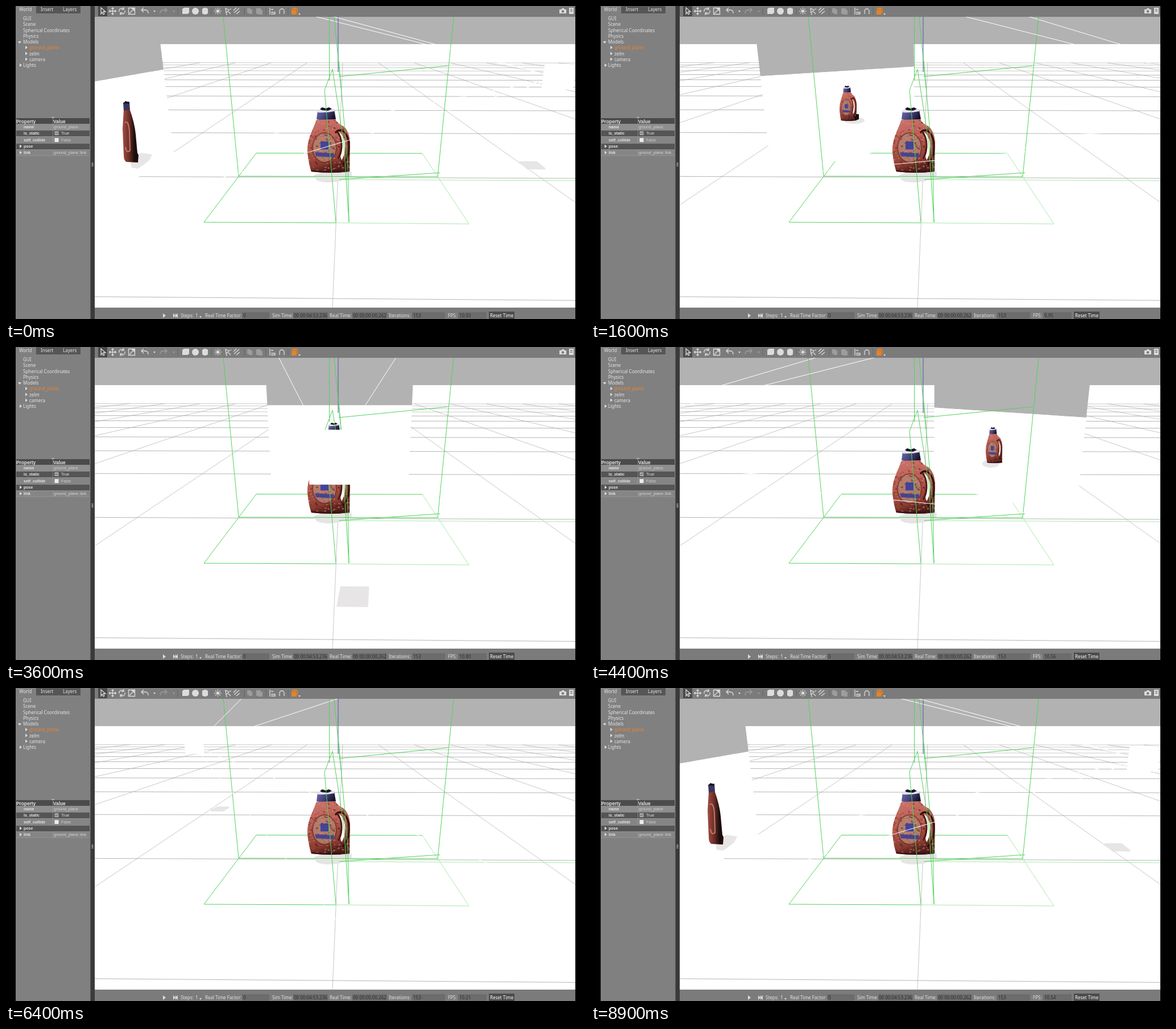
Write an HTML page that moves like this. It is 1018 px wide and 550 px high and loops after 9.1 s.

```html
<!DOCTYPE html>
<html lang="en">
<head>
<meta charset="utf-8">
<title>Camera around a bottle</title>
<style>
html, body { margin: 0; width: 100%; height: 100%; overflow: hidden; background: #000; }
svg { display: block; width: 1018px; height: 550px; }
text { font: 8px "Noto Sans", "Open Sans", sans-serif; fill: #e4e4e4; white-space: pre; }
.prop text { font: 7px "Liberation Sans", Arial, sans-serif; }
.prop .b { font-weight: bold; }
.grid line { stroke: #a2a2a2; stroke-width: .8; }
.green path { stroke: #4fd35a; stroke-width: 1; fill: none; }
.green .pale { stroke: #a9e8ae; }
.rays line { stroke: #fff; stroke-width: 1; }
.icon { fill: none; stroke: #dcdcdc; stroke-width: 1.3; }
.solid { fill: #dcdcdc; }
.dim { opacity: .35; }
</style>
</head>
<body>
<svg viewBox="0 0 1018 550" xmlns="http://www.w3.org/2000/svg">
<defs>
  <clipPath id="view"><rect x="156" y="19" width="845" height="511"/></clipPath>
  <clipPath id="skin"><path d="M546 200 L579 199 Q583 207 593 211 Q603 219 605 238 L604 291 Q570 295 537 291 Q533 282 530 257 Q529 240 537 222 Z"/></clipPath>
  <linearGradient id="red" x1="0" y1="0" x2=".25" y2="1">
    <stop offset="0" stop-color="#cf7972"/><stop offset=".5" stop-color="#b4594d"/>
    <stop offset=".85" stop-color="#8c3d32"/><stop offset="1" stop-color="#4c1c19"/>
  </linearGradient>
  <linearGradient id="cap" x1="0" y1="0" x2="1" y2=".4">
    <stop offset="0" stop-color="#6d6cab"/><stop offset=".55" stop-color="#45447d"/><stop offset="1" stop-color="#17152b"/>
  </linearGradient>
  <linearGradient id="shade">
    <stop offset="0" stop-color="#a24e42"/><stop offset=".4" stop-color="#6d2f28"/><stop offset=".75" stop-color="#1d0d0d"/>
  </linearGradient>
  <g id="bottle">
    <path d="M548 183 L577 182 L580 199 Q564 204 546 199 Z" fill="url(#cap)"/>
    <path d="M548 183 L577 181 L577 185 Q562 188 548 187 Z" fill="#e4e1ec"/>
    <path d="M552 181 L556 178 L562 180 L568 178 L573 181 L566 184 L555 183 Z" fill="#171520"/>
    <g clip-path="url(#skin)">
      <rect x="528" y="198" width="80" height="96" fill="url(#red)"/>
      <ellipse cx="560" cy="249" rx="20" ry="25" fill="#b28572" opacity=".8"/>
      <g id="spots"></g>
      <ellipse cx="560" cy="249" rx="21" ry="26" fill="none" stroke="#6d2c26" stroke-width="2" opacity=".6"/>
      <rect x="553" y="238" width="14" height="14" fill="#43439a"/>
      <path d="M543 257 L577 259 L576 266 L545 264 Z" fill="#46448f"/>
      <path d="M579 223 Q585 215 594 221 Q604 230 603 252 Q602 269 592 279" fill="none" stroke="#2a1010" stroke-width="3"/>
      <path d="M583 221 Q593 224 596 240 Q598 258 590 271 L588 264 Q594 248 589 234 Z" fill="#fff"/>
      <path d="M582 220 Q590 230 590 244 Q590 258 584 268" fill="none" stroke="#4b1d18" stroke-width="3"/>
      <path d="M532 288 Q570 292 606 286 V296 H530 Z" fill="#35110f" opacity=".8"/>
    </g>
  </g>
</defs>

<g clip-path="url(#view)">
  <rect x="156" y="19" width="845" height="511" fill="#b2b2b2"/>
  <rect x="156" y="67" width="845" height="463" fill="#fff"/>
  <g id="grid" class="grid"></g>
  <g class="green">
    <path d="M580 381 L348 380 L440 258.500 L732 259"/>
    <path class="pale" d="M732 259 L814 383 L580 381 M586 305 L1001 307"/>
  </g>
  <path id="screenSky" fill="#b2b2b2"/>
  <path id="screenGround" fill="#fff"/>
  <g id="mini"></g>
  <path id="camShadow" fill="#e7e5e5" stroke="#e7e5e5" stroke-width="3" stroke-linejoin="round"/>
  <path d="M541 298 Q550 291 575 292 L607 291 Q611 300 600 303 L586 308 Q560 313 546 306 Z" fill="#e6e4e4"/>
  <g id="backBody"></g>
  <g id="backRays" class="rays"></g>
  <use href="#bottle"/>
  <path d="M584 19 V116" stroke="#5353a8"/>
  <g class="green">
    <path d="M382 19 L409 299 L759 300 L787 19"/>
    <path d="M568.500 19 V131 M577 19 L589 145 M585 96 L601 278 L603 380 L594 242 L574 111 L560 148 L580 380"/>
    <path d="M585 124 L777 105 M586 305 L763 293"/>
  </g>
  <g id="frontRays" class="rays"></g>
  <g id="frontBody"></g>
</g>

<rect x="156" width="845" height="19" fill="#7b7b7b"/>
<rect x="156" y="530" width="845" height="20" fill="#7b7b7b"/>
<rect x="17" width="133" height="550" fill="#808080"/>
<rect x="53" width="78" height="13" fill="#565656"/>
<rect x="149" width="7" height="550" fill="#3a3a3a"/>
<rect x="148" width="1" height="550" fill="#5a5a5a"/>
<path d="M150.500 276h3M150.500 278.500h3M150.500 281h3M80 196h5" stroke="#ddd"/>
<g id="tree"></g>
<g id="props" class="prop"></g>
<g id="tools"></g>
<g id="status"></g>
</svg>

<script>
const LOOP = 9100;
const RADIUS = 0.99, REACH = 1.98, HALF = 0.49, EYE = 0.49;
const CENTRE_Y = -0.05, VIEWER_Y = -1.953;
const $ = id => document.getElementById(id);

// start time, camera corner on a square path, frame rate readout
const POSES = [
  [0, 1, 0, "10.93"], [1400, 1, -1, "9.95"], [2700, 0, -1, "10.80"],
  [3800, -1, -1, "10.56"], [4700, -1, 0, "10.03"], [5900, -1, 1, "10.21"],
  [6900, 0, 1, "10.53"], [7800, 1, 1, "10.47"], [8400, 1, 0, "10.54"]
];

// ground coordinates in metres (x right, y away, z up) to the stage
function project([x, y, z]) {
  const drop = 0.66 - z;
  const depth = y - VIEWER_Y + 0.298 * drop - 0.013 * x;
  return [593.8 + (764 * x - 22) / depth, 56.5 + 797 * drop / depth];
}
const flat = points => "M" + points.map(p => project(p).map(v => v.toFixed(1)).join(" ")).join("L") + "Z";
function segment(a, b, extra = "") {
  const [x1, y1] = project(a), [x2, y2] = project(b);
  return `<line x1="${x1}" y1="${y1}" x2="${x2}" y2="${y2}" ${extra}/>`;
}

function buildGrid() {
  let out = "";
  for (let n = -1; n <= 10; n++) {
    out += segment([-10, n, 0], [10, n, 0], n > 6 ? 'opacity=".7"' : "");
    out += segment([n, -1.2, 0], [n, 10, 0], 'opacity=".75"');
    if (n > 1) out += segment([-n, -1.2, 0], [-n, 10, 0], 'opacity=".75"');
  }
  $("grid").innerHTML = out;
}

function buildSpots() {
  let seed = 7, out = "";
  const rand = () => (seed = seed * 16807 % 2147483647) / 2147483647;
  const tones = ["#e59b8d", "#5a2019", "#8f3c33", "#d3806f", "#45150f"];
  for (let i = 0; i < 340; i++) {
    const x = 529 + rand() * 77, y = 200 + rand() * 92;
    out += `<ellipse cx="${x.toFixed(1)}" cy="${y.toFixed(1)}" rx="${(0.6 + rand() * 1.6).toFixed(1)}" ry="${(0.5 + rand()).toFixed(1)}" fill="${tones[i % 5]}" opacity=".5"/>`;
  }
  $("spots").innerHTML = out;
}

const label = (x, y, s, extra = "") => `<text x="${x}" y="${y}" ${extra}>${s}</text>`;
const arrow = (x, y, open) => `<path class="solid" d="M${x} ${y}${open ? "h6l-3 4z" : "v6l4 -3z"}"/>`;
const smallArrow = (x, y) => `<path class="solid" d="M${x} ${y}h4l-2 3z"/>`;
const box = (x, y, w, h, fill) => `<rect x="${x}" y="${y}" width="${w}" height="${h}" fill="${fill}"/>`;

function buildPanel() {
  const rows = [[30, "GUI"], [30, "Scene"], [30, "Spherical Coordinates"], [30, "Physics"], [30, "Models"],
    [41, "ground_plane"], [41, "zelm"], [41, "camera"], [30, "Lights"]];
  $("tree").innerHTML =
    label(23, 9, "World") + label(61, 9, "Insert") + label(100, 9, "Layers") +
    rows.map(([x, s], i) => label(x, 25 + i * 10.25, s, i === 5 ? 'style="fill:#f0822a"' : "")).join("") +
    arrow(21, 62, true) + [70, 80.5, 90.5].map(y => arrow(34, y)).join("") + arrow(24, 101);

  const bold = (x, y, s) => label(x, y, s, 'class="b"');
  const head = (x, s) => label(x, 205.5, s, 'style="font-size:8.3px;font-weight:bold"');
  const check = (y, fill) => box(85.5, y, 7, 7, fill);
  $("props").innerHTML =
    box(18, 197, 129, 10, "#4b4b4b") + box(18, 207, 129, 11, "#8e8e8e") + box(18, 218, 129, 11, "#555") +
    box(18, 229, 129, 12, "#858585") + box(18, 241, 129, 11, "#555") + box(18, 252, 129, 11, "#858585") +
    '<path d="M82.5 197V241M82.5 252V263M18 218.5H147M18 229.5H147M18 241.5H147M18 252.5H147M18 263H147" stroke="#a0a0a0" stroke-width=".6"/>' +
    head(18, "Property") + head(83, "Value") +
    bold(31, 214.5, "name") + label(84, 214.5, "ground_plane", 'opacity=".75"') +
    bold(31, 226, "is_static") + check(220, "#a8a8a8") + '<path d="M87 223l1.5 2 2.5 -3" stroke="#555" fill="none"/>' + label(97, 226, "True") +
    bold(31, 238, "self_collide") + check(232, "#ececec") + label(97, 238, "False", 'opacity=".75"') +
    bold(31, 249, "pose") + bold(31, 260, "link") + label(84, 260, "ground_plane::link", 'opacity=".85"') +
    arrow(24, 243.5) + arrow(24, 254.5);
}

function buildTools() {
  const path = (d, cls = "icon", extra = "") => `<path class="${cls}" d="${d}" ${extra}/>`;
  const sun = x => {
    let d = "";
    for (let i = 0; i < 8; i++) {
      const a = i * Math.PI / 4, c = Math.cos(a), s = Math.sin(a);
      d += `M${x + 4 * c} ${9 + 4 * s}L${x + 6 * c} ${9 + 6 * s}`;
    }
    return `<circle class="solid" cx="${x}" cy="9" r="2.8"/>` + path(d);
  };
  const seps = [302, 361, 419, 457, 496].map(x => `M${x} 3V16`).join("");
  $("tools").innerHTML =
    box(162, 0, 16, 18, "#4a4a4a") + path("M167 3l8 7h-4l2 4 -2 1 -2 -4 -2 3z") +
    path("M187.5 3V15M181.5 9H193.5M185.5 5l2 -2 2 2M185.5 13l2 2 2 -2M183.5 7l-2 2 2 2M191.5 7l2 2 -2 2") +
    path("M199 10a5 5 0 0 1 8 -5M209 8a5 5 0 0 1 -8 5M207 2v4h-4M201 16v-4h4") +
    path("M215.5 3.5h11v11h-11zM217 13l8 -8M221 5h4v4") +
    path("M239 7h6q5 0 5 6M242 3l-4 4 4 4") + smallArrow(259, 8) +
    '<g class="dim">' + path("M282 7h-6q-5 0 -5 6M279 3l4 4 -4 4") + smallArrow(293, 8) + "</g>" +
    path("M310 5l3 -2h9v9l-3 2h-9z", "solid") +
    '<circle class="solid" cx="333" cy="9" r="6"/>' + path("M345 5q5 -4 10 0v8q-5 4 -10 0z", "solid") +
    sun(372.5) + path("M386 4l6 3 -5 5zM391 10l4 4M388 13v3M393 6l3 -1") +
    path("M400 8l5 -5M401 12l9 -8M405 14l6 -5") +
    '<g class="dim">' + path("M424 4h6v8h-6zM427 6h6v8h-6z", "solid") + path("M440 4h8v10h-8zM444 7h7v8h-7z", "solid") + "</g>" +
    path("M464 3V15M466 6h4M466 11h7v3h-7") +
    path("M481 14V9a4 4 0 0 1 8 0v5") +
    path("M502 6l2 -3h9v8l-2 4h-9z", "solid", 'style="fill:#e0842f"') +
    path("M502 6h9v9M511 6l2 -3", "icon", 'style="stroke:#a9682f;stroke-width:.8"') + smallArrow(514, 13) +
    path("M973 6h3l2 -2h3l1 2h3v7h-12z", "solid") + '<circle cx="979" cy="9.5" r="2.2" fill="#7b7b7b"/>' +
    path("M990 3h8v11h-8z", "solid") + path("M992 6h4M992 9h4", "icon", 'style="stroke:#7b7b7b"') +
    `<path d="${seps}" stroke="#666"/>`;
}

function buildStatus() {
  const field = (x, w) => box(x, 538, w, 12, "#6c6c6c");
  const dark = 'style="fill:#2c2c2c"';
  $("status").innerHTML =
    field(415, 48) + field(505, 61) + field(609, 61) + field(714, 58) + field(795, 50) +
    '<path class="solid" d="M276 540l5 4 -5 4z"/><path class="solid" d="M294 540l4 4 -4 4zM298 540l4 4 -4 4zM301 540h1v8h-1z"/>' +
    label(307, 547, "Steps:") + label(333, 547, "1") + smallArrow(340, 545) +
    label(350, 547, "Real Time Factor:") + label(417, 547, "0", dark) +
    label(468, 547, "Sim Time:") + label(506, 547, "00 00:04:53.236", dark) +
    label(569, 547, "Real Time:") + label(610, 547, "00 00:00:00.262", dark) +
    label(673, 547, "Iterations:") + label(716, 547, "153", dark) +
    label(777, 547, "FPS:") + `<text id="fps" x="797" y="547" ${dark}></text>` +
    box(849, 537, 45, 13, "#4c4c4c") + label(851, 547, "Reset Time", 'style="fill:#fff"');
}

// the bottle as it appears on the camera's floating screen
function miniature(px, py) {
  const shadow = (x, y, rx, ry) => `<ellipse cx="${x}" cy="${y}" rx="${rx}" ry="${ry}" fill="#e7e5e5"/>`;
  const copy = (x, y, sx, sy) => `<use href="#bottle" transform="translate(${x} ${y}) scale(${sx} ${sy}) translate(-530 -178)"/>`;
  if (py > 0) return "";
  if (py < 0) {
    if (px > 0) return shadow(463, 201, 18, 6) + copy(437, 140, .4, .54) + '<path d="M462 195l4 -1v-4h5v9l-6 2z" fill="#161010"/>';
    if (px < 0) return shadow(703, 205, 15, 7) + copy(694, 141, .39, .55);
    return copy(557, 133, .6, .64);
  }
  if (px > 0) return '<path d="M219 276L229 263 238 258 257 261 252 271 242 279 232 286 221 284Z" fill="#e7e5e5"/>' +
    '<path d="M207 182L217 180Q226 205 228 225L231 258 233 262 232 275 212 274Q207 272 207 262L205 215Z" fill="url(#shade)"/>' +
    '<path d="M209 205Q215 199 217 220L218 254Q212 260 210 248" fill="none" stroke="#c2786b" stroke-width="2"/>' +
    '<path d="M206 170L217 168 218 182 207 184Z" fill="#37355f"/><path d="M206 171L210 167 216 169 217 172Z" fill="#15131d"/>';
  return '<path d="M915 268L929 264 940 270 945 292 938 301 925 294 926 283Z" fill="#e7e5e5"/>' +
    '<path d="M952 195L966 195 966 240 964 283Q959 292 950 291L939 283Q940 250 946 217Z" fill="url(#red)"/>' +
    '<path d="M941 258L939 283 950 291Q962 291 964 282L965 240Q954 278 941 258Z" fill="#3a1412" opacity=".75"/>' +
    '<path d="M952 179L966 178 966 195 952 197Z" fill="#514f98"/><path d="M953 177L965 176 966 182 953 182Z" fill="#e4e1ec"/>' +
    '<path d="M953 178l4 -2 3 2 5 -2" stroke="#222" fill="none"/>';
}

function setPose(px, py) {
  const r = RADIUS * Math.hypot(px, py);
  const nx = px * RADIUS / r, ny = py * RADIUS / r, tx = -ny, ty = nx;
  const cx = px * RADIUS, cy = py * RADIUS + CENTRE_Y;
  const mx = cx - nx * REACH, my = cy - ny * REACH;
  const onScreen = (side, z) => [mx + side * HALF * tx, my + side * HALF * ty, z];
  const top = EYE + HALF;

  const facing = -mx * nx + (VIEWER_Y - my) * ny > 0;
  $("screenSky").setAttribute("d", facing ? flat([onScreen(-1, top), onScreen(1, top), onScreen(1, EYE), onScreen(-1, EYE)]) : "");
  $("screenGround").setAttribute("d", facing ? flat([onScreen(-1, EYE), onScreen(1, EYE), onScreen(1, 0), onScreen(-1, 0)]) : "");
  $("mini").innerHTML = miniature(px, py);

  const rays = ["", ""];
  for (const side of [-1, 1])
    for (const z of [0, top])
      rays[side * ty < 0 ? 1 : 0] += segment([cx, cy, EYE], onScreen(side, z));
  $("backRays").innerHTML = rays[0];
  $("frontRays").innerHTML = rays[1];

  const sx = cx + 0.06, sy = cy + 0.27;
  $("camShadow").setAttribute("d", flat([[sx - .04, sy + .06, 0], [sx + .05, sy + .06, 0], [sx + .04, sy - .06, 0], [sx - .05, sy - .06, 0]]));

  const wall = (a, b, fill) => `<path fill="${fill}" d="${flat([[...a, .549], [...b, .549], [...b, .443], [...a, .443]])}"/>`;
  const corner = (side, back) => [cx + side * .045 * tx + back * nx, cy + side * .045 * ty + back * ny];
  const front = -.05, rear = .045;
  const body = wall(corner(-1, rear), corner(1, rear), "#fff") +
    wall(corner(-1, front), corner(-1, rear), "#fff") + wall(corner(1, front), corner(1, rear), "#fff") +
    wall(corner(-1, front), corner(1, front), px < 0 && py === 0 ? "#636363" : "#fff");
  $("backBody").innerHTML = py < 0 ? "" : body;
  $("frontBody").innerHTML = py < 0 ? body : "";
}

let shown = -1;
function render(now) {
  const t = now % LOOP;
  const index = POSES.filter(p => p[0] <= t).length - 1;
  if (index === shown) return;
  const [, px, py, fps] = POSES[index];
  setPose(px, py);
  $("fps").textContent = fps;
  shown = index;
}

buildGrid();
buildSpots();
buildPanel();
buildTools();
buildStatus();
const start = performance.now();
function tick() {
  render(performance.now() - start);
  requestAnimationFrame(tick);
}
tick();
</script>
</body>
</html>
```
